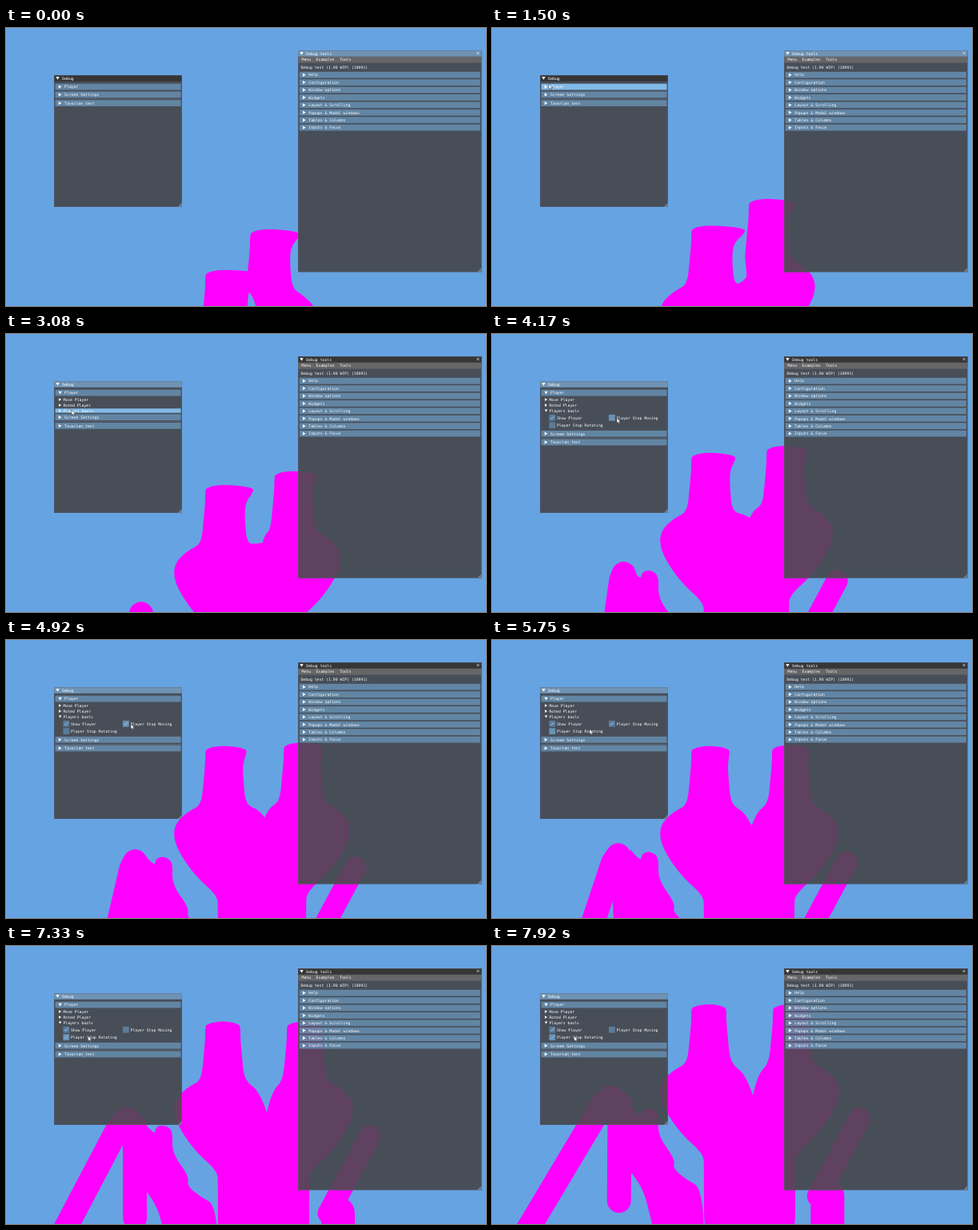
An HTML page with a canvas for the animation above (8 s loop, 600 px wide and 348 px high).

```html
<!DOCTYPE html>
<html lang="en">
<head>
<meta charset="utf-8">
<title>Debug windows</title>
<style>
html, body { margin: 0; width: 100%; height: 100%; overflow: hidden; background: #66a3e2; }
canvas { display: block; }
</style>
</head>
<body>
<canvas id="stage" width="600" height="348"></canvas>
<script>
const ctx = document.getElementById('stage').getContext('2d');
const LOOP = 8000, STEP = 1000 / 12;
const ROW = 7.8, ROW_GAP = 9.42;
const PLAYER_OPEN = 1700, BOOLS_OPEN = 3400;
const MOVE_STOP = 4600, MOVE_RESUME = 6300, ROTATE_STOP = 7300;
const RISE = 37, TURN_TIME = 6.7, AXIS = 322, FLOOR = 620;

// One leg edge as [half width, y, share of the foot]; then the torso side below the hip.
const LEG_X = 271;
const LEG_EDGE = [[27, 377, .2], [24, 347, .2], [22, 325, .35], [22, 313, .9], [21, 306, 1]];
const TORSO = [[229, 384], [213, 398], [209, 414], [215, 434], [236, 465], [264, 490], [265, 505], [265, FLOOR]];
const HAND = [[173, 430], [186, 446], [187, 435], [198, 432], [209, 440], [207, 467], [229, 497],
  [226, 508], [242, 522], [263, 533], [266, FLOOR], [210, FLOOR], [200, 578], [190, 536], [173, 512]];

// Arrival time and place of each cursor stop.
const TRAVEL = 400;
const STOPS = [[0, -40, 130], [1350, 71, 70], [2900, 82, 95], [4050, 156, 105],
  [5500, 108, 115], [6000, 152, 104], [6650, 102.5, 112.5]];

const clamp = (v, lo, hi) => Math.min(hi, Math.max(lo, v));
const mix = (a, b, u) => a + (b - a) * u;

function trace(points) {
  ctx.beginPath();
  points.forEach(([x, y]) => ctx.lineTo(x, y));
}

function polygon(points, color) {
  trace(points);
  ctx.closePath();
  ctx.fillStyle = color;
  ctx.fill();
}

function limb(points, width) {
  trace(points);
  ctx.lineWidth = width;
  ctx.stroke();
}

function softShape(points) {
  ctx.beginPath();
  ctx.moveTo(...points[0]);
  for (let i = 1; i < points.length - 1; i++) {
    const [x, y] = points[i], [nx, ny] = points[i + 1];
    ctx.quadraticCurveTo(x, y, (x + nx) / 2, (y + ny) / 2);
  }
  ctx.lineTo(...points[points.length - 1]);
  ctx.fill();
}

function halfBody(crotch, innerFoot, outerFoot) {
  const edge = (side, foot) =>
    LEG_EDGE.map(([w, y, share]) => [LEG_X + side * (w + share * foot), y]);
  const inner = edge(1, innerFoot), outer = edge(-1, outerFoot).reverse();
  const [hipX, hipY] = inner[0];
  const fold = [mix(hipX, crotch[0], .7), mix(hipY, crotch[1], .35)];
  return [crotch, fold, ...inner, [LEG_X, 302], ...outer, ...TORSO, [AXIS + 20, FLOOR]];
}

function drawFigure(time, color) {
  const t = time / 1000;
  const moved = (time - clamp(time - MOVE_STOP, 0, MOVE_RESUME - MOVE_STOP)) / 1000;
  const turned = Math.min(t / TURN_TIME, 1);
  const away = 1 - Math.sin(turned * Math.PI / 2);
  const foot = 32 * (1 - turned);

  ctx.save();
  ctx.translate(0, -RISE * moved);
  ctx.fillStyle = ctx.strokeStyle = color;
  ctx.lineCap = ctx.lineJoin = 'round';

  // The far half mirrors the near one and lags behind while the figure turns.
  const mirrorX = x => 2 * AXIS - 46 * away - x, lag = 51 * away;
  const crotch = [316 + 10 * turned, 364 + 53 * turned ** 2];
  softShape(halfBody(crotch, foot, 0));
  softShape(halfBody([mirrorX(crotch[0]), crotch[1] + lag], 0, foot * .6)
    .map(([x, y]) => [mirrorX(x), y - lag]));

  const drop = 100 * away;
  const elbowX = 182 - 4.2 * t, elbowY = 478 - 9.3 * t;
  const lean = Math.max(0, .12 * (t - 3)), spread = Math.max(0, 2 * (t - 2.5));
  limb([
    [elbowX - spread - lean * 200, elbowY + 222], [elbowX - spread, elbowY + 24],
    [elbowX, elbowY + 15],
    [elbowX + spread, elbowY + 24], [elbowX + 10, 549 + drop]], 30);
  softShape(HAND.map(([x, y]) => [x, y + drop]));

  const fingerX = 400 + 7.5 * t, fingerY = 446 + drop;
  limb([[fingerX, fingerY], [fingerX - 52, fingerY + 97]], 27);
  limb([[fingerX - 40, fingerY + 97], [fingerX - 40, FLOOR]], 42);
  ctx.restore();
}

function rect(x, y, w, h, color) {
  ctx.fillStyle = color;
  ctx.fillRect(x, y, w, h);
}

function label(text, x, y) {
  ctx.fillStyle = '#fff';
  ctx.fillText(text, x, y + 1.7);
}

function arrow(x, y, open, size = 2.2) {
  const s = size, h = size * 0.85;
  polygon(open ? [[x - s, y - h], [x + s, y - h], [x, y + h]]
               : [[x - h, y - s], [x + h, y], [x - h, y + s]], '#fff');
}

function cursorAt(t) {
  let [, x, y] = STOPS[0];
  for (const [arrival, nextX, nextY] of STOPS) {
    const u = clamp((t - arrival) / TRAVEL + 1, 0, 1), ease = u * u * (3 - 2 * u);
    x = mix(x, nextX, ease);
    y = mix(y, nextY, ease);
  }
  return [x, y];
}

function panel(t, x, y, w, h, title, focused) {
  rect(x, y, w, h, '#474e58');
  ctx.save();
  ctx.beginPath();
  ctx.rect(x, y, w, h);
  ctx.clip();
  drawFigure(t, '#5f425f');
  ctx.restore();
  rect(x, y, w, ROW, focused ? '#6f93b5' : '#363636');
  polygon([[x + w, y + h - 5.5], [x + w, y + h], [x + w - 5.5, y + h]], '#6f8090');
  ctx.strokeStyle = 'rgba(95,106,122,.6)';
  ctx.lineWidth = 0.6;
  ctx.strokeRect(x + .3, y + .3, w - .6, h - .6);
  arrow(x + 4.5, y + ROW / 2, true);
  label(title, x + 10.3, y + ROW / 2);
}

function header(text, x, y, w, open, hovered) {
  rect(x, y - ROW / 2, w, ROW, hovered ? '#81b9e6' : 'rgba(118,170,216,.6)');
  arrow(x + 6, y, open);
  label(text, x + 11.5, y);
}

function checkbox(text, x, y, checked, hovered) {
  rect(x, y - ROW / 2, ROW, ROW, hovered ? '#6991b3' : '#5c7b99');
  if (checked) {
    ctx.strokeStyle = '#8cc8fc';
    trace([[x + 1.8, y + 0.2], [x + 3.2, y + 1.7], [x + 6.1, y - 1.7]]);
    ctx.lineWidth = 1;
    ctx.stroke();
  }
  label(text, x + 9.5, y);
}

function drawDebug(t, [cx, cy]) {
  const open = t >= PLAYER_OPEN, bools = t >= BOOLS_OPEN;
  const left = 61.6, width = 157;
  const over = (x, y, w, h) => cx >= x && cx < x + w && Math.abs(cy - y) <= h / 2;
  const section = (text, y, isOpen) =>
    header(text, left, y, width, isOpen, over(left, y, width, ROW));
  const node = (text, y, isOpen) => {
    if (over(left, y, width, 5.4)) rect(left, y - 2.7, width, 5.4, '#81b9e6');
    arrow(67.6, y, isOpen, 1.8);
    label(text, 71.4, y);
  };
  const check = (text, x, y, checked) =>
    checkbox(text, x, y, checked, over(x, y, 9.5 + text.length * 2.9, ROW));

  panel(t, 60, 59, 160, 165, 'Debug', open);
  section('Player', 73.6, open);
  if (open) {
    node('Move Player', 82.1, false);
    node('Roted Player', 89.1, false);
    node('Players bools', 96, bools);
  }
  if (bools) {
    check('Show Player', 71.4, 104.8, true);
    check('Player Stop Moving', 146, 104.8, t >= MOVE_STOP && t < MOVE_RESUME);
    check('Player Stop Rotating', 71.4, 114.2, t >= ROTATE_STOP);
  }
  const y = bools ? 124.8 : open ? 104.2 : 83.4;
  section('Screen Settings', y, false);
  rect(left, y + 5.2, width, 0.5, '#6b7280');
  section('Tavorian_test', y + 10.7, false);
}

function drawTools(t) {
  const x = 365, y = 28, w = 229.5, menuY = 39.6;
  panel(t, x, y, w, 277.5, 'Debug tools', t < PLAYER_OPEN);
  ctx.strokeStyle = '#fff';
  ctx.lineWidth = 0.6;
  for (const d of [-1.6, 1.6]) {
    trace([[590 - d, 29.8], [590 + d, 33]]);
    ctx.stroke();
  }
  rect(x, y + ROW, w, ROW, '#666668');
  label('Menu', 369.5, menuY);
  label('Examples', 387.6, menuY);
  label('Tools', 417.2, menuY);
  label('Debug test (1.90 WIP) (18991)', 368.4, 49.1);
  ['Help', 'Configuration', 'Window options', 'Widgets', 'Layout & Scrolling',
   'Popups & Modal windows', 'Tables & Columns', 'Inputs & Focus']
    .forEach((text, i) => header(text, 366.8, 58.7 + i * ROW_GAP, 226, false, false));
}

function drawCursor([x, y]) {
  const shape = [[0, 0], [0, 6.6], [1.5, 5.2], [2.6, 7.6], [3.7, 7.1], [2.7, 4.8], [4.8, 4.7]];
  polygon(shape.map(([dx, dy]) => [x + dx, y + dy]), '#fff');
  ctx.strokeStyle = '#222';
  ctx.lineWidth = 0.5;
  ctx.stroke();
}

function draw(now) {
  const t = Math.floor((now % LOOP + 5) / STEP) * STEP % LOOP;
  ctx.font = '4.8px "DejaVu Sans Mono", monospace';
  rect(0, 0, 600, 348, '#66a3e2');
  drawFigure(t, '#ff00ff');
  const cursor = cursorAt(t);
  drawDebug(t, cursor);
  drawTools(t);
  drawCursor(cursor);
}

const began = performance.now();
function tick() {
  draw(performance.now() - began);
  requestAnimationFrame(tick);
}
tick();
</script>
</body>
</html>
```
